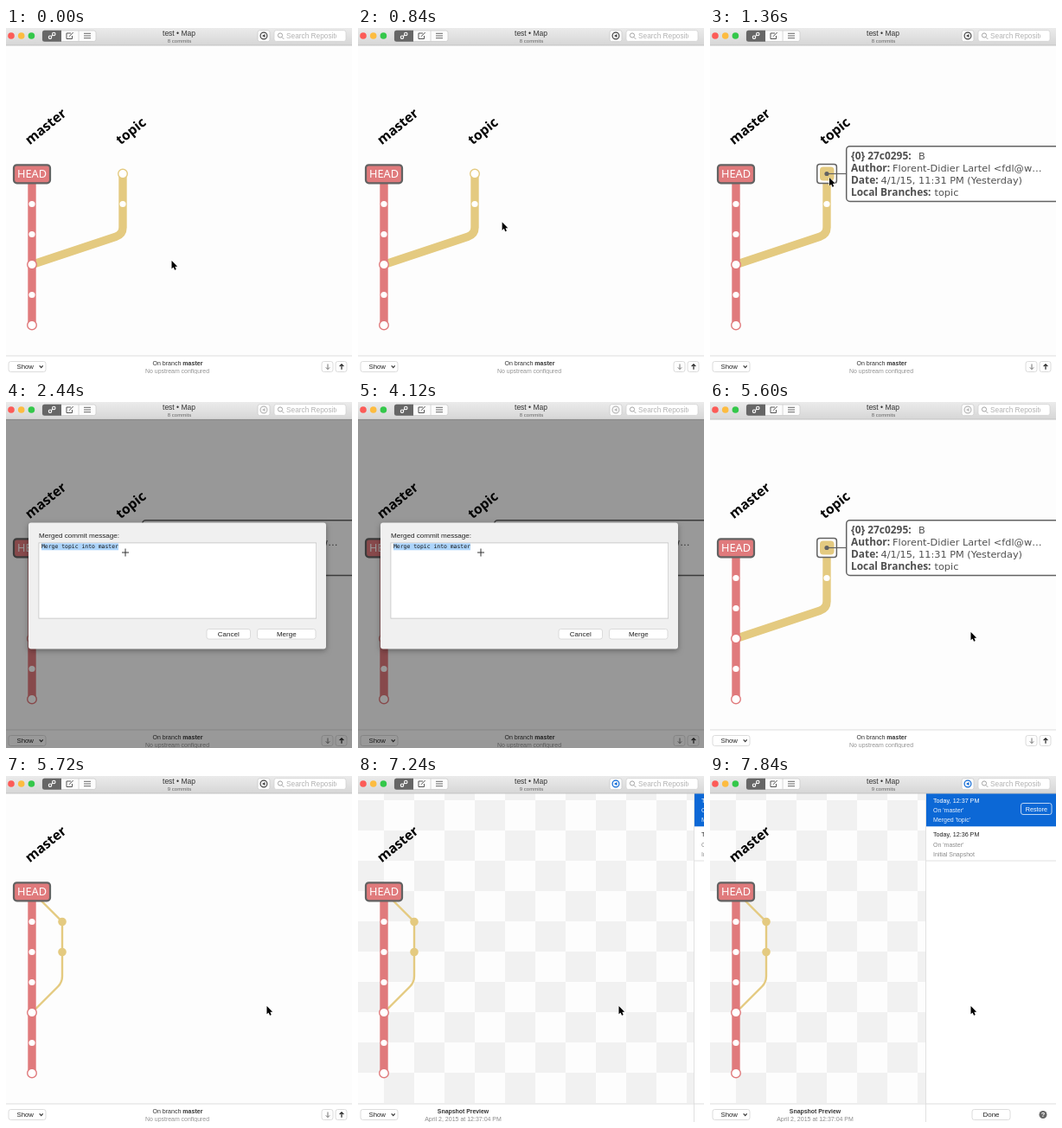
Animation, 400 px wide and 400 px high, one loop 8000 ms. Source, as an HTML page with a canvas:

```html
<!DOCTYPE html>
<html>
<head>
<meta charset="utf-8">
<style>
  html, body { margin: 0; width: 100%; height: 100%; overflow: hidden; background: #fdfdfd; }
  canvas { display: block; width: 400px; height: 400px; }
</style>
</head>
<body>
<canvas id="stage" width="400" height="400"></canvas>
<script>
const LOOP = 8000, STEP = 40;
const RED = '#e07a7c', YELLOW = '#e4ca80', DARK = '#626262', BLUE = '#0c68d6', PAPER = '#fdfdfd';
const UI = '"Liberation Sans", Arial, sans-serif';
const LABEL = '"Noto Sans", "Open Sans", sans-serif';
const WIDE = '"DejaVu Sans", sans-serif';
const MONO = '"DejaVu Sans Mono", monospace';
const ctx = document.getElementById('stage').getContext('2d');

const smooth = u => { u = Math.min(1, Math.max(0, u)); return u * u * (3 - 2 * u); };
const mix = (a, b, u) => a + (b - a) * u;

function text(str, x, y, size, color = '#222', { font = UI, bold = false, align = 'left' } = {}) {
  ctx.font = `${bold ? 'bold ' : ''}${size}px ${font}`;
  ctx.textAlign = align;
  ctx.fillStyle = color;
  ctx.fillText(str, x, y);
}

function box(x, y, w, h, r, fill, stroke, lineWidth = 1) {
  ctx.beginPath();
  ctx.roundRect(x, y, w, h, r);
  paint(fill, stroke, lineWidth);
}

function circle(x, y, r, fill, stroke, lineWidth = 1) {
  ctx.beginPath();
  ctx.arc(x, y, r, 0, 2 * Math.PI);
  paint(fill, stroke, lineWidth);
}

function path(d, stroke, lineWidth = 1, fill) {
  const shape = new Path2D(d);
  if (fill) { ctx.fillStyle = fill; ctx.fill(shape); }
  if (stroke) { ctx.strokeStyle = stroke; ctx.lineWidth = lineWidth; ctx.stroke(shape); }
}

function paint(fill, stroke, lineWidth) {
  if (fill) { ctx.fillStyle = fill; ctx.fill(); }
  if (stroke) { ctx.strokeStyle = stroke; ctx.lineWidth = lineWidth; ctx.stroke(); }
}

function rect(x, y, w, h, fill) {
  ctx.fillStyle = fill;
  ctx.fillRect(x, y, w, h);
}

function button(x, y, w, h, label, fill = '#fff') {
  box(x, y + .5, w, h, 2.5, fill, '#d4d4d4', .8);
  if (label) text(label, x + w / 2, y + h / 2 + 3, 8, '#222', { align: 'center' });
}

function toolbar(commits, historyColor) {
  const shade = ctx.createLinearGradient(0, 0, 0, 20);
  shade.addColorStop(0, '#ebebeb');
  shade.addColorStop(1, '#d6d6d6');
  rect(0, 0, 400, 20, shade);
  rect(0, 19.5, 400, 1, '#c4c4c4');
  ['#fc5b57', '#fdbc40', '#34c84a'].forEach((color, i) => circle(6 + 11.7 * i, 9, 3.8, color));

  box(42, 3, 62, 12.5, 2.5, '#fcfcfc', '#c8c8c8', .7);
  box(42, 2.7, 22, 13, [2.5, 0, 0, 2.5], '#666');
  rect(83.7, 3, .7, 12.5, '#c8c8c8');
  circle(51, 10.7, 1.7, null, '#fff', 1.1);
  circle(55.3, 7, 1.7, null, '#fff', 1.1);
  path('M52.3 9.6 54.1 8.1', '#fff', 1.1);
  path('M75 6H70V12.5H76.5V9M73 9.8 77.7 5', '#555', 1);
  path('M90 6.3H98M90 9H98M90 11.7H98', '#555', .9);

  text('test • Map', 200, 9, 8.5, '#333', { align: 'center' });
  text(`${commits} commits`, 200.5, 17, 6, '#666', { align: 'center' });

  box(291, 2.7, 14, 13, 2.5, '#fcfcfc', '#c8c8c8', .7);
  circle(298, 9, 3.9, null, historyColor, 1.2);
  path('M299.5 6.9 296 9 299.5 11.1Z', null, 0, historyColor);

  box(310, 2.7, 83, 12.7, 2.5, '#fff', '#cecece', .7);
  circle(317, 8.5, 2.6, null, '#999', .9);
  path('M319 10.6 321.3 12.9', '#999', .9);
  ctx.save();
  ctx.beginPath();
  ctx.rect(322, 0, 60, 20);
  ctx.clip();
  text('Search Repository', 324, 12, 8.3, '#b2b2b2');
  ctx.restore();
}

function bottomBar(preview) {
  rect(0, 378.5, 400, 21.5, '#fff');
  rect(0, 378.5, 400, 1, '#dedede');
  button(3, 385, 43, 12);
  text('Show', 12.5, 394, 7.8);
  path('M38.7 390.3 40.7 392.6 42.7 390.3', '#333', 1.2);
  if (preview) {
    text('Snapshot Preview', 121.5, 390, 6.9, '#333', { bold: true, align: 'center' });
    text('April 2, 2015 at 12:37:04 PM', 121.5, 399, 7, '#8c8c8c', { align: 'center' });
    return;
  }
  text('On branch ', 169.5, 390, 7.05, '#333');
  text('master', 204.3, 390, 7.05, '#333', { bold: true });
  text('No upstream configured', 198, 399, 6.95, '#929292', { align: 'center' });
  button(365, 385, 13, 12, '', '#fdfdfd');
  button(381, 385, 13, 12, '', '#fdfdfd');
  path('M372 388.5V394.5M369.8 392.4 372 394.6 374.2 392.4', '#666', .9);
  path('M388 394.8V388.8M385.6 391.2 388 388.8 390.4 391.2', '#222', 1.2);
}

function branchLabel(name, x, y) {
  ctx.save();
  ctx.translate(x - 2.5, y);
  ctx.rotate(-39 * Math.PI / 180);
  text(name, 0, 0, 15.6, '#000', { font: LABEL, bold: true });
  ctx.restore();
}

const dot = (x, y) => circle(x, y, 3.6, '#fff');
const node = (x, y, color) => circle(x, y, 5.3, '#fff', color, 1.4);

function mainLine(top) {
  path(`M30 ${top}V343`, RED, 9.4);
  for (let y = top + 35; y < 343; y += 35) if (y !== 273) dot(30, y);
  node(30, 273, RED);
  node(30, 343, RED);
  box(9, top - 10.2, 42, 21, 3.5, RED, DARK, 2.2);
  text('HEAD', 30, top + 4.6, 12.8, '#fff', { font: LABEL, align: 'center' });
  branchLabel('master', 30, top - 33);
}

function splitMap() {
  path('M135 168V230Q135 238 127 240.7L30 273', YELLOW, 9.4);
  dot(135, 203);
  node(135, 168, YELLOW);
  branchLabel('topic', 135, 135);
  mainLine(168);
}

function mergedMap() {
  path('M30 133 65 168V231Q65 238 60 243L30 273', YELLOW, 2.4);
  circle(65, 168, 4.8, YELLOW);
  circle(65, 203, 4.8, YELLOW);
  mainLine(133);
}

function map(merged) {
  ctx.save();
  ctx.translate(0, .5);
  if (merged) mergedMap(); else splitMap();
  ctx.restore();
}

function checkerboard() {
  for (let row = -1; row < 10; row++)
    for (let col = -1; col < 11; col++)
      if ((row + col) % 2) rect(30 + 35 * col, 28 + 35 * row, 35, 35, '#f1f1f1');
}

function commitDetails(alpha) {
  ctx.globalAlpha = alpha;
  box(123.8, 157.6, 22.6, 22, 3, '#fff', DARK, 1.5);
  box(127, 160.5, 16.5, 16, 4, YELLOW);
  box(157.7, 136.7, 250, 63.8, 4, '#fff', DARK, 1.5);
  path('M135 168.5H157', DARK, 1.2);
  circle(135, 168.5, 2.6, DARK);
  const lines = [
    ['{0} 27c0295:', 'B', 241],
    ['Author:', 'Florent-Didier Lartel <fdl@w…', 211],
    ['Date:', '4/1/15, 11:31 PM (Yesterday)', 197.5],
    ['Local Branches:', 'topic', 259.5],
  ];
  lines.forEach(([label, value, x], i) => {
    const y = 152 + 14.1 * i;
    text(label, 163, y, 11.9, '#505050', { font: LABEL, bold: true });
    text(value, x, y, 11.3, '#505050', { font: WIDE });
  });
  ctx.globalAlpha = 1;
}

function mergeSheet(pressed) {
  rect(0, 20, 400, 380, 'rgba(0,0,0,.4)');
  ctx.save();
  ctx.shadowColor = 'rgba(0,0,0,.35)';
  ctx.shadowBlur = 6;
  ctx.shadowOffsetY = 2;
  box(26, 139.5, 344, 146, 3, '#f0f0f0');
  ctx.restore();
  text('Merged commit message:', 38, 156.5, 8.1);
  rect(37.5, 162.5, 321.5, 88, '#c4c4c4');
  rect(38.3, 163.3, 320, 86.4, '#fff');
  rect(41, 163.3, 89, 8, '#add5fc');
  text('Merge topic into master', 41, 169.3, 6.43, '#111', { font: MONO });
  button(232, 262, 50.5, 11.5, 'Cancel');
  button(290.5, 262, 67.5, 11.5, 'Merge', pressed ? '#ececec' : '#fff');
}

function snapshotEntry(y, lines, titleColor, color) {
  text(lines[0], 9, y + 10.5, 7.2, titleColor);
  text(lines[1], 9, y + 22, 7, color);
  text(lines[2], 9, y + 33, 7, color);
}

function snapshotList(x) {
  ctx.save();
  ctx.translate(x, 0);
  rect(0, 20, 151, 380, '#fff');
  rect(0, 20, .9, 380, '#dedede');
  rect(1, 20, 150, 38.3, BLUE);
  snapshotEntry(20, ['Today, 12:37 PM', "On 'master'", "Merged 'topic'"], '#fff', '#e8f1fd');
  box(110.5, 31.5, 35.5, 13, 2.5, null, '#cfe0f8', .9);
  text('Restore', 128.3, 40.7, 7.2, '#fff', { align: 'center' });
  snapshotEntry(59.5, ['Today, 12:36 PM', "On 'master'", 'Initial Snapshot'], '#222', '#8a8a8a');
  rect(1, 97.5, 150, 1, '#e2e2e2');
  rect(0, 378.5, 151, 1, '#dedede');
  button(54, 385, 44, 12, 'Done');
  circle(136, 391.5, 4.5, '#666');
  text('?', 136, 394.3, 7.5, '#fff', { bold: true, align: 'center' });
  ctx.restore();
}

function arrow(x, y) {
  ctx.save();
  ctx.translate(x, y);
  path('M0 0V9.2L2.1 7.4 3.6 10.7 5.2 10 3.8 6.8H6.6Z', '#fff', 1, '#000');
  path('M0 0V9.2L2.1 7.4 3.6 10.7 5.2 10 3.8 6.8H6.6Z', null, 0, '#000');
  ctx.restore();
}

function cross(x, y) {
  path(`M${x - 4} ${y}H${x + 4}M${x} ${y - 4.5}V${y + 4.5}`, '#333', 1);
}

function cursor(t) {
  if (t < 2440) {
    const u = smooth((t - 440) / 840);
    return arrow(mix(191.5, 138, u), mix(269, 173, u));
  }
  if (t < 4280) return cross(t < 3640 ? 138 : t < 4120 ? 139 : 142, 174);
  const u = smooth((t - 4240) / 640);
  const x = mix(142, 301.5, u), y = mix(174, 266, u);
  (y < 250 ? cross : arrow)(x, y);
}

function draw(t) {
  const sheet = t >= 2440 && t < 5600;
  const merged = t >= 5720;
  const preview = t >= 7240;
  const disabled = t >= 2440 && !merged;

  rect(0, 0, 400, 400, PAPER);
  if (preview) checkerboard();
  map(merged);
  if (t >= 1320 && !merged) commitDetails(t < 1360 ? .5 : 1);
  bottomBar(preview);
  if (preview) {
    const slide = smooth((t - 7560) / 280);
    snapshotList(mix(388, 249, slide * (t >= 7640)));
  }
  toolbar(merged ? 9 : 8, preview ? BLUE : disabled ? '#b8b8b8' : '#444');
  if (sheet) mergeSheet(t >= 4920);
  cursor(t);
}

const start = performance.now();
function frame() {
  const t = (performance.now() - start) % LOOP;
  draw(Math.floor(t / STEP) * STEP);
  requestAnimationFrame(frame);
}
frame();
</script>
</body>
</html>
```
